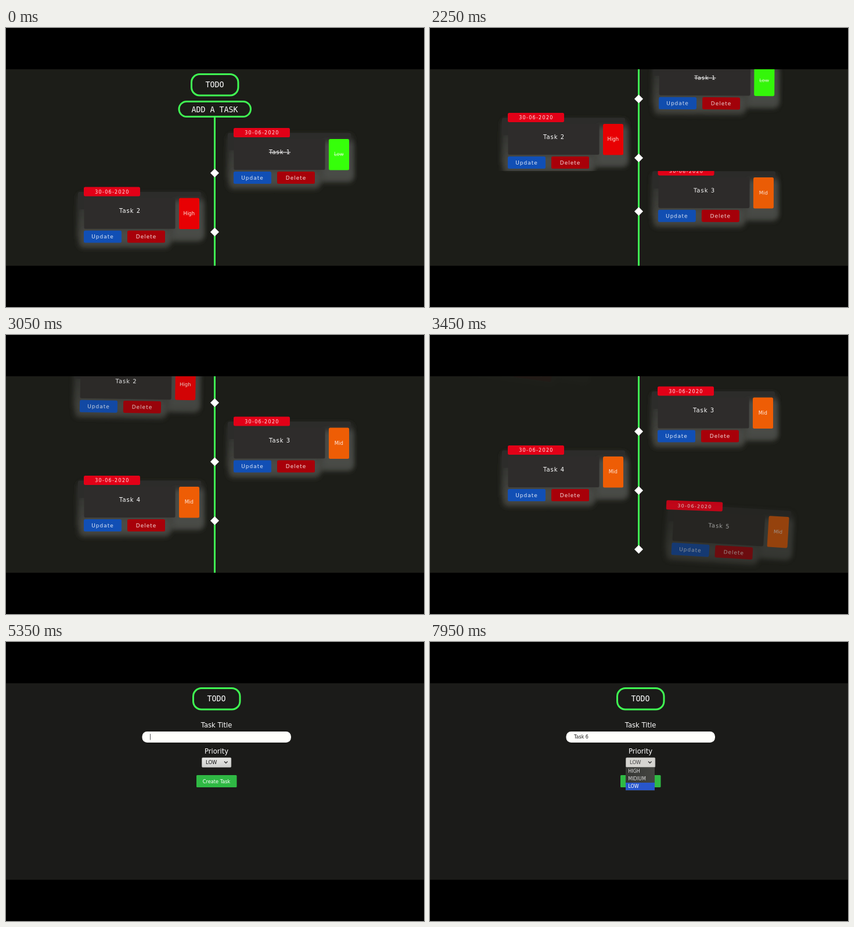
Animation of 720 by 480 pixels, one loop 8000 ms. Source, as an HTML page:

```html
<!DOCTYPE html>
<html lang="en">
<head>
<meta charset="utf-8">
<title>Todo timeline</title>
<style>
  html, body { margin: 0; width: 100%; height: 100%; overflow: hidden; background: #000; }
  svg { display: block; width: 720px; height: 480px; }
  text { font-family: "DejaVu Sans", sans-serif; fill: #fff; white-space: pre; }
  .mono { font: 13.33px "DejaVu Sans Mono", monospace; }
  .mid { text-anchor: middle; }
  .ring { fill: none; stroke: #40fb53; stroke-width: 3; }
</style>
</head>
<body>
<svg viewBox="0 0 720 480" xmlns="http://www.w3.org/2000/svg">
  <defs>
    <clipPath id="view"><rect y="71" width="720" height="338"/></clipPath>
    <clipPath id="lower"><rect y="246" width="720" height="163"/></clipPath>
    <filter id="soft" x="-30%" y="-50%" width="160%" height="200%"><feGaussianBlur stdDeviation="4.5"/></filter>
    <linearGradient id="glow" x2="0" y2="1">
      <stop offset="0" stop-color="#2d2d2b"/>
      <stop offset=".55" stop-color="#3a3b37"/>
      <stop offset="1" stop-color="#454641"/>
    </linearGradient>
    <linearGradient id="metal" x2="0" y2="1">
      <stop offset="0" stop-color="#e8e8e6"/>
      <stop offset="1" stop-color="#cfd0ce"/>
    </linearGradient>
    <linearGradient id="menuBg">
      <stop offset="0" stop-color="#363734"/>
      <stop offset="1" stop-color="#444541"/>
    </linearGradient>
  </defs>
  <rect width="720" height="480"/>
  <g clip-path="url(#view)">
    <g id="listPage">
      <rect y="71" width="720" height="338" fill="#1c1d18"/>
      <g id="list">
        <rect class="ring" x="319.5" y="79.5" width="80.5" height="36.5" rx="14"/>
        <text class="mono mid" x="359.5" y="102.3">TODO</text>
        <rect x="358" y="153" width="3" height="502" fill="#40fb53"/>
        <rect class="ring" x="298" y="126.5" width="123.5" height="26" rx="13"/>
        <text class="mono mid" x="359.5" y="144.6">ADD A TASK</text>
        <g id="cards"></g>
      </g>
      <g id="tear" clip-path="url(#lower)">
        <rect y="71" width="720" height="338" fill="#1c1d18"/>
        <use href="#list" y="-9.3"/>
      </g>
    </g>
    <g id="formPage">
      <rect y="71" width="720" height="338" fill="#1b1b19"/>
      <rect class="ring" x="322.5" y="79.5" width="80.5" height="36.5" rx="14"/>
      <text class="mono mid" x="362.5" y="102.3">TODO</text>
      <text class="mid" x="362.6" y="146.6" font-size="11.6">Task Title</text>
      <rect x="234.5" y="154" width="256.5" height="19" rx="8.5" fill="#fffffc"/>
      <text id="typed" x="248" y="166" font-size="8" style="fill:#1c1c1c"></text>
      <rect id="caret" y="158" width="1" height="10.5" fill="#555"/>
      <text class="mid" x="362.6" y="192" font-size="11.6">Priority</text>
      <rect id="select" x="337.5" y="199" width="50.3" height="16.5" rx="1.5" stroke="#b5b6b2" stroke-width=".6"/>
      <text id="choice" x="344" y="210.2" font-size="8.5">LOW</text>
      <path d="M376 205.5l2.8 2.8 2.8-2.8" fill="none" stroke="#333" stroke-width="1.4"/>
      <rect x="328" y="229" width="69.5" height="21" rx="1.5" fill="#2fb944"/>
      <text class="mid" x="362.6" y="242.7" font-size="8.2">Create Task</text>
      <g id="menu" font-size="8">
        <rect x="337" y="215.5" width="50" height="40" fill="url(#menuBg)"/>
        <rect x="337" y="242" width="50" height="13" fill="#2856cc"/>
        <text x="341.3" y="225.2" style="fill:#dedede">HIGH</text>
        <text x="341.3" y="238.3" style="fill:#dedede">MIDIUM</text>
        <text x="341.3" y="251.4">LOW</text>
      </g>
    </g>
  </g>
</svg>
<script>
const $ = id => document.getElementById(id);
const LOOP = 8000, STEP = 50, JUMP = 3900, FORM = 4800;
const GREEN = '#36ff0a', RED = '#e80003', ORANGE = '#ee5d05';

// Each card: priority, its colour, start of entering and of leaving
const tasks = [
  { level: 'Low', color: GREEN, leave: 2180 },
  { level: 'High', color: RED, leave: 2930 },
  { level: 'Mid', color: ORANGE, enter: 1800 },
  { level: 'Mid', color: ORANGE, enter: 2438 },
  { level: 'Mid', color: ORANGE, enter: 3300 }
];
const scrollKeys = [[1300, 0], [1450, 8], [1650, 34.2], [2250, 127.5], [2350, 141], [2650, 182.3], [3450, 286.3], [3600, 300]];
const typing = [[0, ''], [5750, 'T'], [5900, 'Ta'], [6050, 'Tas'], [6200, 'Task'], [6350, 'Task '], [6800, 'Task 6']];
const caretX = [248, 252.5, 257.3, 261.5, 266, 269, 274];

const box = (x, y, w, h, fill, r = 2.5) =>
  `<rect x="${x}" y="${y}" width="${w}" height="${h}" rx="${r}" fill="${fill}"/>`;
const label = (x, y, size, spacing, str, extra = '') =>
  `<text class="mid" x="${x + spacing / 2}" y="${y}" font-size="${size}" letter-spacing="${spacing}" ${extra}>${str}</text>`;

function cardMarkup(task, i) {
  const strike = i === 0 ? 'text-decoration="line-through"' : '';
  const tint = i === 0 ? 'style="fill:#c9ffb9"' : 'style="fill:#ffeae0"';
  return `
    <g class="body">
      <g filter="url(#soft)">
        ${box(-11, -67, 217, 83, 'url(#glow)', 8)}
        ${box(-9, -5, 83, 33, '#3c3d38', 8)}
        ${box(66, -5, 83, 33, '#3c3d38', 8)}
      </g>
      ${box(-10, -69, 212, 30, '#2c2c2a', 3)}
      <g filter="url(#soft)">
        ${box(154, -54, 52, 64, '#4a4b46', 4)}
        ${box(-2, -4, 150, 24, '#4a4b46', 4)}
      </g>
      ${box(.5, -58.5, 157, 53, '#2e2c2b')}
      ${box(164, -58.5, 35, 53.5, task.color)}
      ${box(0, -2.5, 65, 21, '#114fb5')}
      ${box(75, -2.5, 65, 21, '#a80009')}
      ${label(79, -32.6, 10, 1, 'Task ' + (i + 1), strike)}
      ${label(181.3, -29.2, 8.5, 0, task.level, tint + strike)}
      ${label(32, 11.2, 9, 1, 'Update', 'style="fill:#dfe8f8"')}
      ${label(107, 11.2, 9, 1, 'Delete', 'style="fill:#f6dede"')}
    </g>
    <g class="date">
      ${box(0, -77.5, 97, 16, '#e20017')}
      ${label(48.3, -66.2, 8, 1.3, '30-06-2020', 'style="fill:#ffe9e9"')}
    </g>`;
}

tasks.forEach((task, i) => {
  task.y = 249.5 + 101.4 * i;
  task.side = i % 2 ? -1 : 1;
  task.x = i % 2 ? 134 : 392;
  const g = document.createElementNS('http://www.w3.org/2000/svg', 'g');
  g.innerHTML = `<g class="card">${cardMarkup(task, i)}</g>
    <path d="M359.5 ${task.y - 7.5}l7.5 7.5-7.5 7.5-7.5-7.5z" fill="#fff"/>`;
  $('cards').append(g);
  for (const part of ['card', 'body', 'date']) task[part] = g.querySelector('.' + part);
});

const clamp = v => Math.max(0, Math.min(1, v));
const show = (id, on) => $(id).setAttribute('display', on ? 'inline' : 'none');

function track(keys, t) {
  if (t <= keys[0][0]) return keys[0][1];
  for (let i = 1; i < keys.length; i++) {
    const [t0, a] = keys[i - 1], [t1, b] = keys[i];
    if (t < t1) return a + (b - a) * (t - t0) / (t1 - t0);
  }
  return keys[keys.length - 1][1];
}

// 0 = at rest, 1 = swung out and invisible
function swing(task, t) {
  if (t >= JUMP) return task.enter ? 1 : 0;
  if (task.enter) return (1 - clamp((t - task.enter) / 600)) ** 3;
  const u = clamp((t - task.leave) / 600);
  return u * u * (3 - 2 * u);
}

function drawList(t) {
  const y = t < JUMP ? track(scrollKeys, t) : 0;
  $('list').setAttribute('transform', `translate(0 ${-y})`);
  show('tear', t >= 2250 && t < 2350);
  for (const task of tasks) {
    const q = swing(task, t), dir = task.side;
    task.card.setAttribute('transform',
      `translate(${task.x + 62 * dir * q} ${task.y - 7.5 * q}) rotate(${8.2 * q} 100 -30)`);
    task.date.setAttribute('transform', `translate(${-32 * dir * q} ${4 * q}) rotate(${-3.5 * q} 48 -69)`);
    task.body.setAttribute('opacity', 1 - q);
    task.date.setAttribute('opacity', 1 - q * q);
  }
}

function drawForm(t) {
  const str = typing.filter(k => t >= k[0]).pop()[1];
  $('typed').textContent = str;
  $('caret').setAttribute('x', caretX[str.length]);
  show('caret', t >= 5350 && t < 7750 && !(t >= 6550 && t < 6800));
  const pressed = t >= 7750;
  $('select').setAttribute('fill', pressed ? '#d5d4d0' : 'url(#metal)');
  $('choice').style.fill = pressed ? '#444' : '#111';
  show('menu', t >= 7950);
}

function render(time) {
  const t = Math.floor(time % LOOP / STEP) * STEP;
  const form = t >= FORM;
  show('listPage', !form);
  show('formPage', form);
  (form ? drawForm : drawList)(t);
}

const start = performance.now();
function tick() {
  render(performance.now() - start);
  requestAnimationFrame(tick);
}
tick();
</script>
</body>
</html>
```
